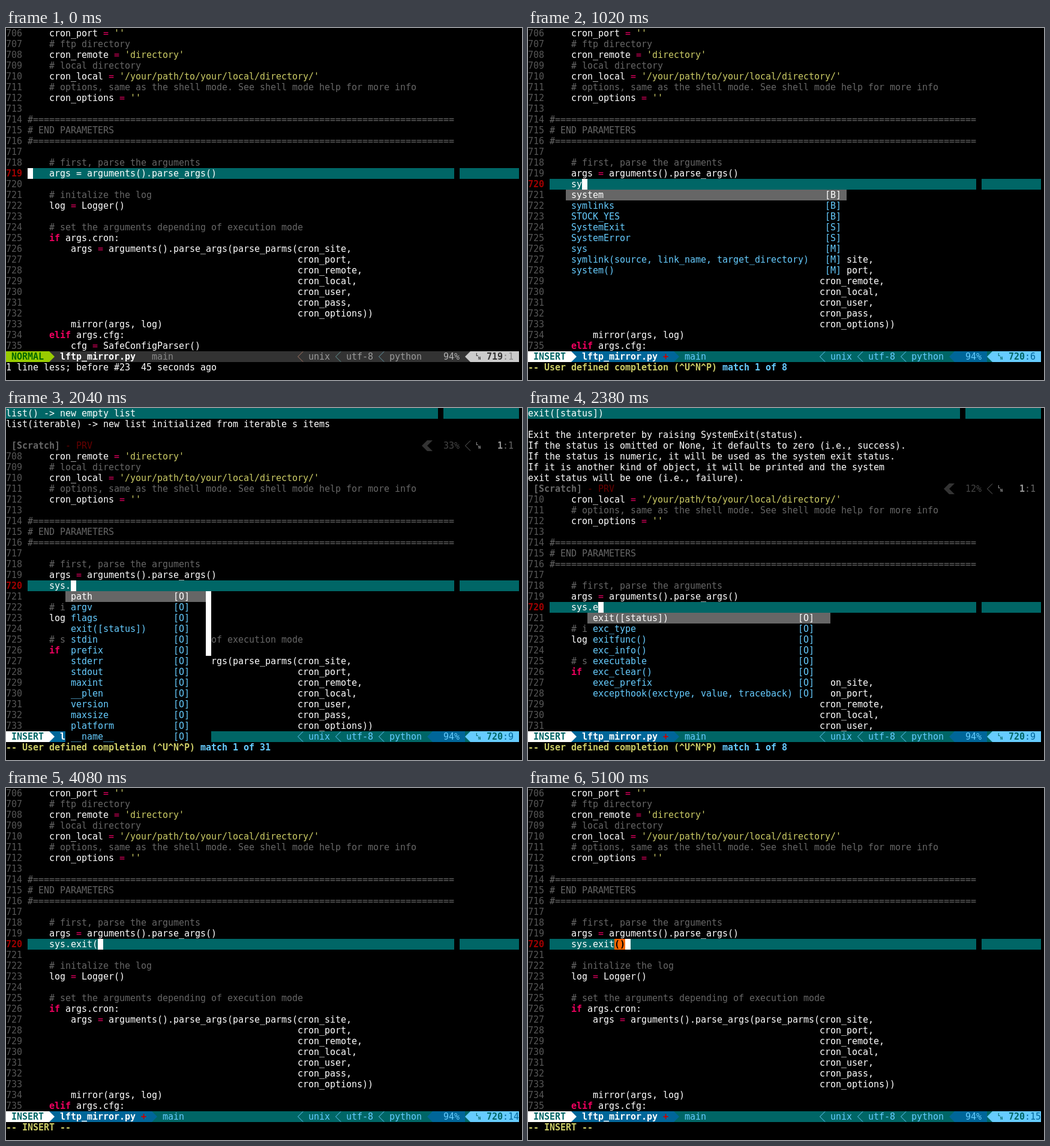
Animation of 860 by 588 pixels, one loop 5780 ms. Source, as an HTML page with a canvas:

```html
<!DOCTYPE html>
<html lang="en">
<head>
<meta charset="utf-8">
<title>Editor completion</title>
<style>
html, body { margin: 0; width: 100%; height: 100%; overflow: hidden; background: #000; }
canvas { display: block; }
</style>
</head>
<body>
<canvas id="stage" width="860" height="588"></canvas>
<script>
const ctx = document.getElementById('stage').getContext('2d');
const CW = 9, RH = 18, LOOP = 5780, STATUS = 30, MESSAGE = 31;
const FONT = '15px "DejaVu Sans Mono", monospace';
const C = {
  text: '#fff', number: '#555', current: '#a00000', comment: '#666', string: '#cccc66',
  op: '#e0005f', key: '#f0005f', teal: '#006666', blue: '#006699', sky: '#66ccff',
  select: '#666', bar: '#333'
};

const rule = '#' + '='.repeat(78);
const pad = n => ' '.repeat(n);
const head = [
  "    cron_port = ''",
  '    # ftp directory',
  "    cron_remote = 'directory'",
  '    # local directory',
  "    cron_local = '/your/path/to/your/local/directory/'",
  '    # options, same as the shell mode. See shell mode help for more info',
  "    cron_options = ''",
  '', rule, '# END PARAMETERS', rule, '',
  '    # first, parse the arguments',
  '    args = arguments().parse_args()'
];
const tail = [
  '',
  '    # initalize the log',
  '    log = Logger()',
  '',
  '    # set the arguments depending of execution mode',
  '    if args.cron:',
  '        args = arguments().parse_args(parse_parms(cron_site,',
  ...['port,', 'remote,', 'local,', 'user,', 'pass,', 'options))'].map(s => pad(50) + 'cron_' + s),
  '        mirror(args, log)',
  '    elif args.cfg:',
  '        cfg = SafeConfigParser()'
];

const listDoc = {
  lines: ['list() -> new empty list', 'list(iterable) -> new list initialized from iterable s items', ''],
  percent: '33%'
};
const exitDoc = {
  lines: [
    'exit([status])', '',
    'Exit the interpreter by raising SystemExit(status).',
    'If the status is omitted or None, it defaults to zero (i.e., success).',
    'If the status is numeric, it will be used as the system exit status.',
    'If it is another kind of object, it will be printed and the system',
    'exit status will be one (i.e., failure).'
  ],
  percent: '12%'
};

// Menu entries are "word|kind"; kind defaults to O.
const buffer = ['system|B', 'symlinks|B', 'STOCK_YES|B', 'SystemExit|S', 'SystemError|S'];
const omni = ['exit([status])', 'exc_type', 'exitfunc()', 'exc_info()', 'executable',
  'exc_clear()', 'exec_prefix', 'excepthook(exctype, value, traceback)'];
const wideMenu = { col: 7, kind: 55, end: 59, total: 8,
  items: [...buffer, 'sys|M', 'symlink(source, link_name, target_directory)|M', 'system()|M'] };
const bufferMenu = { col: 7, kind: 20, end: 24, total: 5, items: buffer };
const sysMenu = { col: 11, kind: 31, end: 37, thumb: 6, total: 31,
  items: ['path', 'argv', 'flags', 'exit([status])', 'stdin', 'prefix', 'stderr', 'stdout',
    'maxint', '__plen', 'version', 'maxsize', 'platform', '__name__'] };
const omniMenu = { col: 11, kind: 50, end: 56, total: 8, items: omni };
const exitMenu = { col: 11, kind: 50, end: 56, thumb: 4, total: 29,
  items: [...omni, 'exi|M', 'exit()|M', 'exc_info()|M', 'exe|B'] };

const steps = [
  { at: 0, normal: true, cursor: 4, pos: 1 },
  { at: 340, typed: '', cursor: 8, pos: 5 },
  { at: 680, typed: 's', cursor: 9, pos: 6 },
  { at: 1020, typed: 'sy', cursor: 10, pos: 6, menu: wideMenu },
  { at: 1700, typed: 'sys', cursor: 11, pos: 8, menu: bufferMenu },
  { at: 2040, typed: 'sys.', cursor: 12, pos: 9, menu: sysMenu, doc: listDoc },
  { at: 2380, typed: 'sys.e', cursor: 13, pos: 9, menu: omniMenu, doc: exitDoc },
  { at: 3060, typed: 'sys.ex', cursor: 14, pos: 9, menu: exitMenu, doc: exitDoc },
  { at: 4080, typed: 'sys.exit(', cursor: 17, pos: 14 },
  { at: 4760, typed: 'sys.exit()', cursor: 16, pos: 14 },
  { at: 5100, typed: 'sys.exit()', cursor: 18, pos: 15, match: true }
];

function fill(col, row, cols, color, rows = 1) {
  ctx.fillStyle = color;
  ctx.fillRect(col * CW, row * RH, cols * CW, rows * RH);
}

function put(str, col, row, color, bold) {
  ctx.font = (bold ? 'bold ' : '') + FONT;
  ctx.fillStyle = color;
  [...str].forEach((ch, i) => {
    if (ch !== ' ') ctx.fillText(ch, (col + i) * CW, row * RH + 14);
  });
  return col + str.length;
}

// Powerline separators: dir 1 points right, -1 points left.
function arrow(col, row, dir, color, thin) {
  const x = col * CW + (dir < 0 ? CW : 0), y = row * RH;
  ctx.beginPath();
  ctx.moveTo(x, y + (thin ? 0.5 : 0));
  ctx.lineTo(x + dir * (thin ? 8.5 : 9), y + 9);
  ctx.lineTo(x, y + (thin ? 17.5 : 18));
  if (thin) {
    ctx.strokeStyle = color;
    ctx.lineWidth = 1;
    ctx.stroke();
  } else {
    ctx.fillStyle = color;
    ctx.fill();
  }
}

function lineMark(row, color) {
  ctx.font = 'bold 7px "DejaVu Sans Mono", monospace';
  ctx.fillStyle = color;
  ctx.fillText('L', 783, row * RH + 8);
  ctx.fillText('N', 787, row * RH + 14);
}

function cursorLine(row, from, gap) {
  fill(from, row, gap - from, C.teal);
  fill(gap + 1, row, 94 - gap, C.teal);
}

function code(str, row) {
  if (str.trim().startsWith('#')) return put(str, 4, row, C.comment);
  let col = 4;
  for (const part of str.split(/('[^']*'|\b(?:el)?if\b|=)/)) {
    const key = /^(el)?if$/.test(part);
    const color = key ? C.key : part === '=' ? C.op : part[0] === "'" ? C.string : C.text;
    col = put(part, col, row, color, key);
  }
}

function preview(doc) {
  const row = doc.lines.length;
  cursorLine(0, 0, 80);
  doc.lines.forEach((s, i) => put(s, 0, i, C.text));
  put('[Scratch]', 1, row, '#666', true);
  put('- PRV', 11, row, '#660000');
  arrow(77, row, -1, C.bar);
  fill(78, row, 1, C.bar);
  arrow(78, row, -1, '#000');
  put(doc.percent, 81, row, '#444');
  arrow(85, row, -1, '#666', true);
  lineMark(row, '#999');
  put('1', 91, row, '#999', true);
  put(':1', 92, row, '#666');
}

function statusBar(s) {
  const r = STATUS, n = s.normal;
  fill(0, r, 95, n ? C.bar : C.teal);
  if (!n) {
    fill(8, r, 19, C.blue);
    arrow(27, r, 1, C.blue);
    put('+', 25, r, '#cc0000', true);
    fill(79, r, 6, C.blue);
    arrow(78, r, -1, C.blue);
  }
  const mode = n ? '#99cc00' : '#fff', end = n ? '#ccc' : C.sky;
  const info = n ? '#999' : C.sky;
  fill(0, r, 8, mode);
  arrow(8, r, 1, mode);
  put(n ? 'NORMAL' : 'INSERT', 1, r, n ? '#006600' : C.teal, true);
  put('lftp_mirror.py', 10, r, '#fff', true);
  put('main', n ? 27 : 29, r, n ? '#888' : C.sky);
  [[54, 'unix', '#a87766'], [61, 'utf-8', '#669999'], [69, 'python', '#6699aa']].forEach(([col, str, tint]) => {
    arrow(col, r, -1, n ? tint : C.sky, true);
    put(str, col + 2, r, info);
  });
  put('94%', 81, r, n ? '#b2b2b2' : C.sky);
  fill(86, r, 9, end);
  arrow(85, r, -1, end);
  lineMark(r, n ? '#333' : C.teal);
  put(n ? '719' : '720', 89, r, n ? '#333' : C.teal, true);
  put(':' + s.pos, 92, r, n ? '#888' : C.blue);
}

function popup(m, top) {
  const rows = m.items.length;
  fill(m.col, top, m.end - m.col, '#000', rows);
  fill(m.col, top, m.end - m.col, C.select);
  if (m.thumb) {
    fill(m.end, top, 1, '#000', rows);
    fill(m.end, top, 1, '#fff', m.thumb);
  }
  m.items.forEach((item, i) => {
    const [word, kind = 'O'] = item.split('|');
    const color = i ? C.sky : '#fff';
    put(word, m.col + 1, top + i, color);
    put('[' + kind + ']', m.kind, top + i, color);
  });
}

function message(s) {
  if (s.normal) return put('1 line less; before #23  45 seconds ago', 0, MESSAGE, C.text);
  if (!s.menu) return put('-- INSERT --', 0, MESSAGE, C.string, true);
  const col = put('-- User defined completion (^U^N^P) ', 0, MESSAGE, C.string, true);
  put('match 1 of ' + s.menu.total, col, MESSAGE, C.sky, true);
}

function draw(s) {
  ctx.fillStyle = '#000';
  ctx.fillRect(0, 0, 860, 588);
  const lines = s.normal ? [...head, ...tail] : [...head, pad(4) + s.typed, ...tail];
  const active = s.normal ? 13 : 14;
  const top = s.doc ? s.doc.lines.length + 1 : 0;
  const skip = top / 2;
  const here = top + active - skip;

  if (s.doc) preview(s.doc);
  cursorLine(here, 4, 83);
  for (let row = top, i = skip; row < STATUS; row++, i++) {
    const on = i === active;
    put(String(706 + i), 0, row, on ? C.current : C.number, on);
    if (on) put(lines[i], 4, row, C.text);
    else code(lines[i], row);
  }
  if (s.match) {
    fill(16, here, 2, '#ff6600');
    put('()', 16, here, '#000', true);
  }
  fill(s.cursor, here, 1, '#fff');
  if (!s.normal) put(lines[active][s.cursor - 4] || ' ', s.cursor, here, '#000');
  statusBar(s);
  if (s.menu) popup(s.menu, here + 1);
  message(s);
}

const start = performance.now();
let shown = null;
function tick() {
  const t = (performance.now() - start) % LOOP;
  const step = steps.filter(s => s.at <= t).pop();
  if (step !== shown) draw(shown = step);
  requestAnimationFrame(tick);
}
tick();
</script>
</body>
</html>
```
